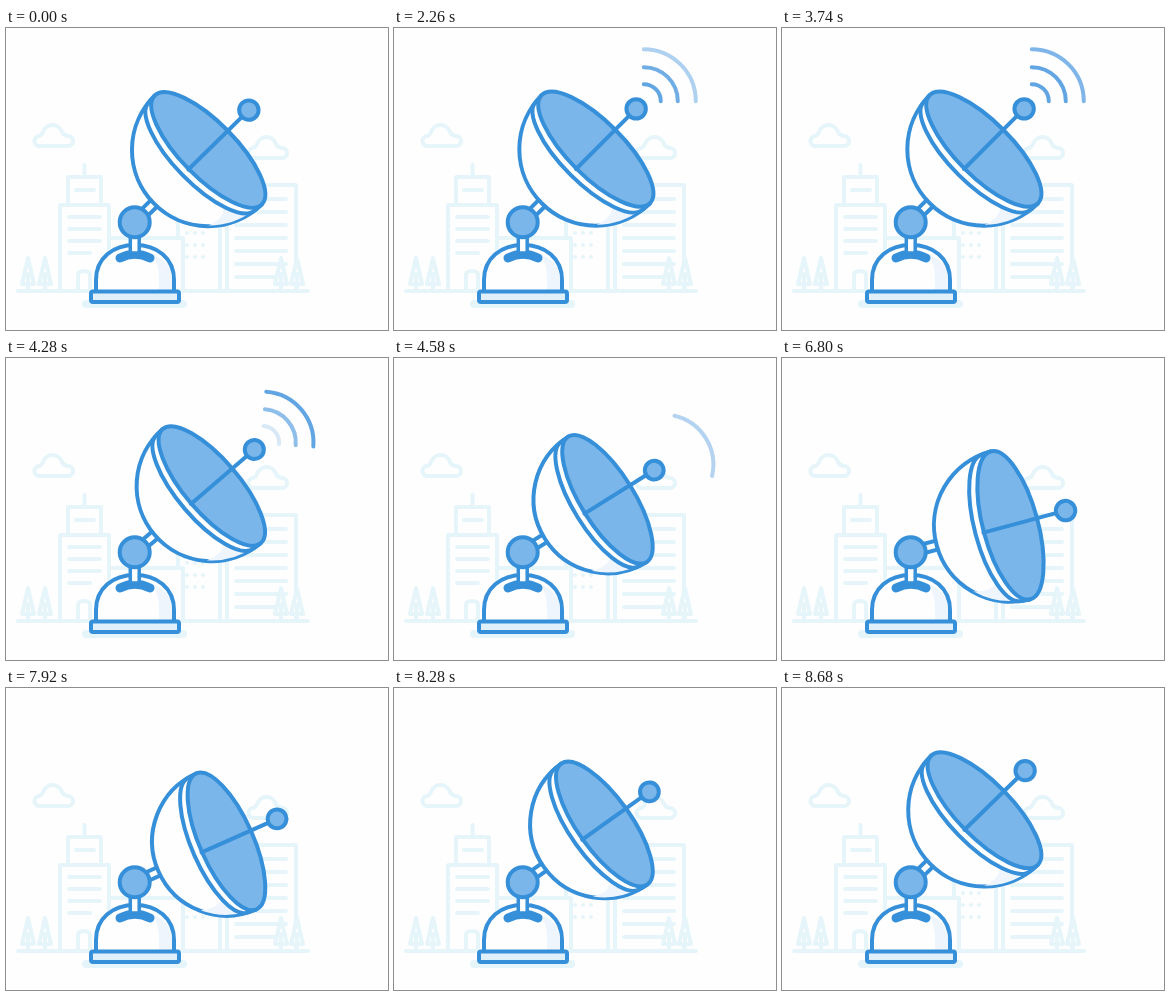
Recreate the animation shown at these times as an HTML page. Size 382 by 302 pixels, loop 8700 ms.

```html
<!DOCTYPE html>
<html lang="en">
<head>
<meta charset="utf-8">
<title>Satellite dish</title>
<style>
  html, body { margin: 0; width: 100%; height: 100%; overflow: hidden; background: #fefefe; }
  svg { display: block; width: 100vw; height: 100vh; }
  .city { fill: none; stroke: #e5f5fa; stroke-width: 4; stroke-linecap: round; stroke-linejoin: round; }
  .city .solid { fill: #fefefe; }
  .ink { fill: none; stroke: #368fd9; stroke-width: 4; stroke-linecap: round; stroke-linejoin: round; }
  .ink * { vector-effect: non-scaling-stroke; }
  .ink .white { fill: #fefefe; }
  .ink .blue { fill: #7ab6ea; }
  .ink .shade { fill: #eff5fc; stroke: none; }
  .wave { stroke: #62a5e3; opacity: 0; }
</style>
</head>
<body>
<svg viewBox="0 0 382 302">
  <defs>
    <path id="cloud" d="M34 118H62A4.5 4.5 0 0 0 62 108Q57 107 56 104A10 10 0 0 0 37 104Q36 107 33 108A5 5 0 0 0 34 118Z"/>
    <path id="tree" d="M0 230L-6 256H6ZM0 246V263"/>
  </defs>

  <g class="city">
    <use href="#cloud"/>
    <use href="#cloud" x="214" y="12"/>
    <path d="M12 263H302"/>
    <path d="M78.500 137V149M62 177V149H95V177M70 162H88"/>
    <path d="M54 263V177H103V263M63 189H94M63 201H94M63 213H94M63 225H84M72 263V247Q72 243 78 243T84 247V263"/>
    <path d="M103 210H177V263M172 210V190H214V263"/>
    <path d="M181 205V241M189 205V241M197 205V241" stroke-dasharray="0 12"/>
    <path d="M221 263V157H290V263M230 171H280M230 184H280M230 197H280M230 210H280M230 223H280M230 236H280M230 249H270"/>
    <g class="solid">
      <use href="#tree" x="22"/>
      <use href="#tree" x="39"/>
      <use href="#tree" x="275"/>
      <use href="#tree" x="291"/>
    </g>
    <path d="M80 276H177" stroke-width="8"/>
  </g>

  <g class="ink">
    <path class="white" d="M90 264V252C90 230 107 217 129 217S168 230 168 252V264Z"/>
    <path class="shade" d="M146 226Q166 234 166 252V262H153V250Q153 236 146 226Z"/>
    <rect x="85" y="263.500" width="88" height="10.500" rx="2" fill="#e0f0fa"/>
    <path d="M114 230Q129 222.500 144 230" stroke-width="9"/>
    <path class="white" d="M124.300 206V225H133.200V206" stroke-width="3.500"/>
  </g>

  <!-- The dish lies along the x axis, with the ball joint at 0,0 -->
  <g class="ink" id="dish">
    <path class="white" d="M12 -4.500H30V4.500H12Z"/>
    <path class="white" d="M103 -76.500A76.500 76.500 0 0 0 103 76.500Z"/>
    <path class="shade" d="M94 75A75 75 0 0 1 50 54Q66 60 74.400 52A27 75.500 0 0 0 94 75Z"/>
    <path class="white" d="M94 -75.800A27 75.800 0 0 0 94 75.800L103 76.500V-76.500Z"/>
    <ellipse class="blue" cx="103" cy="0" rx="27.500" ry="76.500"/>
    <path d="M75 0H150"/>
    <circle class="blue" cx="160" cy="0" r="9.700"/>
  </g>

  <circle class="ink" cx="128.700" cy="194.300" r="15" style="fill:#7ab6ea"/>
</svg>
<script>
const LOOP = 8700, RIGHT = Math.PI / 4, LOW = Math.PI / 12;
const dish = document.getElementById('dish');

// Signals: start, start of fade-out, its length, delay from arc to arc
const signals = [[360, 1120, 320, 0], [1710, 2470, 320, 0], [3060, 3960, 420, 200]];

const waves = [17, 34, 52].map(r => {
  const arc = document.createElementNS('http://www.w3.org/2000/svg', 'path');
  const d = r * Math.SQRT1_2, x = 170.8 + d;
  arc.setAttribute('d', `M${x} ${-d}A${r} ${r} 0 0 1 ${x} ${d}`);
  arc.setAttribute('class', 'wave');
  return dish.appendChild(arc);
});

const ramp = (t, start, length) => Math.min(1, Math.max(0, (t - start) / length));
const ease = x => x * x * (3 - 2 * x);
const mix = (a, b, p) => a + (b - a) * p;

function tilt(t) {
  if (t < 200) t += LOOP; // the return settles just after the loop restarts
  return ease(ramp(t, 3940, 1400)) - ease(ramp(t, 7410, 1400));
}

function draw(now) {
  const t = now % LOOP, p = tilt(t);
  // Points travel in straight lines between both poses
  const a = mix(Math.cos(RIGHT), Math.cos(LOW), p);
  const b = -mix(Math.sin(RIGHT), Math.sin(LOW), p);
  dish.setAttribute('transform', `matrix(${a} ${b} ${-b} ${a} 129 194)`);
  waves.forEach((arc, i) => {
    arc.style.opacity = signals.reduce((sum, [start, out, length, lag]) =>
      sum + ramp(t, start + 170 * i, 420) * (1 - ramp(t, out + lag * i, length)), 0);
  });
}

const begin = performance.now();
function tick() {
  draw(performance.now() - begin);
  requestAnimationFrame(tick);
}
tick();
</script>
</body>
</html>
```
